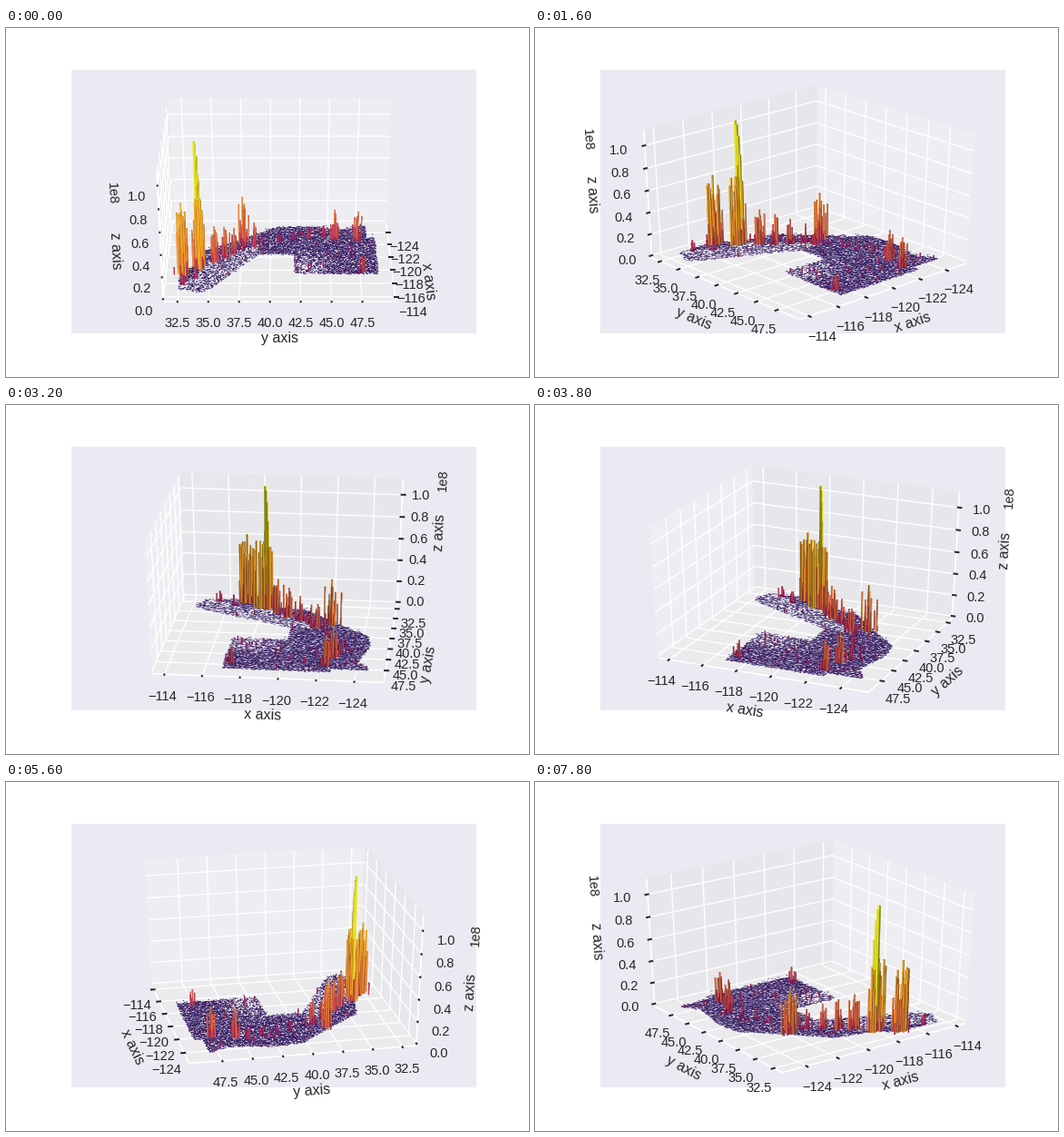
A matplotlib script for the animation above (8 s loop, 576x384 px).

```python
import numpy as np
import matplotlib.pyplot as plt
from matplotlib.animation import FuncAnimation
from matplotlib.collections import LineCollection, PolyCollection
from matplotlib.colors import LinearSegmentedColormap
from matplotlib.transforms import ScaledTranslation

plt.rcParams["font.family"] = "Liberation Sans"

FRAMES, INTERVAL, STEP_DEG = 40, 200, 6
ELEV = np.radians(30)
DIST = 10
EDGE = 0.5 + 1 / 48          # half size of the drawn box
DELTA = 1 / 12
PER_POINT = 48 / 552.2 / 12  # label offset in box units per point
INK = "#262626"

# data limits along x, y, z
LOW = np.array([-125.28, 31.72, 0.0])
HIGH = np.array([-113.6, 49.83, 1.115])

TICKS = [np.arange(-124, -113, 2), np.arange(32.5, 48, 2.5), np.arange(0, 1.1, 0.2)]
FORMATS = ["{:.0f}", "{:.1f}", "{:.1f}"]
SIDE = [1, 0, 0]             # direction in which each axis draws its ticks

rng = np.random.default_rng(7)


def to_box(values):
    return (np.asarray(values) - LOW) / (HIGH - LOW) - 0.5


# ---- data -----------------------------------------------------------------

# main hubs: lon, lat, peak
HUBS = [(-117.1, 32.75, 0.64), (-118.2, 34.0, 0.72), (-122.1, 37.6, 0.42),
        (-121.4, 38.6, 0.22), (-122.6, 45.5, 0.27), (-122.3, 47.5, 0.27),
        (-117.4, 47.65, 0.15)]


def coast(lat):
    line = np.interp(lat, [32.5, 33.9, 34.5, 37.7, 40.4, 42.8, 46.5, 48.3],
                     [-117.2, -118.5, -120.6, -122.5, -124.3, -124.5, -124.0, -124.7])
    return np.where(lat > 48.3, -122.7, line)


def border(lat):
    inland = np.interp(lat, [32.6, 34.3, 35, 39], [-114.7, -114.2, -114.6, -120])
    return np.where(lat > 42, -117, inland)


def make_ground(step=0.1):
    x, y = np.meshgrid(np.arange(-124.8, -114, step), np.arange(32.55, 49.05, step))
    inside = (x > coast(y)) & (x < border(y))
    x, y = x[inside], y[inside]
    keep = 0.9 + 0.12 * np.sin(5 * x + 2 * y) * np.sin(4 * y - x)
    keep -= 0.5 * np.exp(-(x + 118) ** 2 / 3 - (y - 43.2) ** 2 / 3)
    keep -= 0.45 * ((x - coast(y) > 1.8) & (y < 39))
    pts = np.column_stack([x, y])[rng.random(len(x)) < keep]
    return pts + rng.normal(0, 0.03, pts.shape)


def cluster(lon, lat, peak):
    count = int(75 * peak)
    spread = 0.12 + 0.16 * peak
    heights = peak * (0.1 + 0.8 * rng.random(count) ** 1.8)
    pts = np.column_stack([rng.normal(lon, spread, count), rng.normal(lat, spread, count), heights])
    return np.vstack([[lon, lat, peak], pts])


def towns(start, stop, peaks):
    """Small clusters strung along a line."""
    return [cluster(*place, peak) for place, peak in
            zip(np.linspace(start, stop, len(peaks)), peaks)]


def make_bars(ground):
    k = np.arange(5)
    towers = np.column_stack([-118.2 - 0.05 * k, 33.9 + 0.08 * k, HIGH[2] * (1 - 0.03 * k ** 2)])
    groups = [towers] + [cluster(*hub) for hub in HUBS]
    groups += towns((-119.0, 35.3), (-121.0, 37.7), np.linspace(0.32, 0.18, 4))
    groups += towns((-121.8, 39.3), (-123.0, 44.6), np.linspace(0.06, 0.10, 5))
    groups += towns((-116.4, 33.8), (-115.5, 32.8), [0.1, 0.1])
    rural = ground[rng.choice(len(ground), 90, replace=False)]
    groups.append(np.column_stack([rural, 0.01 + 0.05 * rng.random(90) ** 3]))
    return np.vstack(groups)


HEAT = LinearSegmentedColormap.from_list("heat", [
    (0.0, "#22135a"), (0.25, "#78196e"), (0.42, "#be2864"), (0.65, "#f07341"),
    (0.82, "#faaa28"), (0.91, "#eedc1e"), (1.0, "#eef01e")])

ground = make_ground()
bars = make_bars(ground)

# flat ground tiles
corner = np.array([(-1, -1), (1, -1), (1, 1), (-1, 1)])
tiles = np.zeros((len(ground), 4, 3))
tiles[..., :2] = ground[:, None] + corner * rng.uniform(0.045, 0.07, (len(ground), 1, 2))
tiles[..., 2] = rng.exponential(0.007, (len(ground), 1))
tiles = to_box(tiles)
tile_colors = HEAT(0.1 * rng.random(len(ground)) ** 2)

# bar geometry in box units, taller bars are wider
top = to_box(bars)
half = (0.02 + 0.03 * bars[:, 2:] / HIGH[2]) * (1, 1.3) / (HIGH - LOW)[:2]
base_colors = HEAT((bars[:, 2] / HIGH[2]) ** 0.3)[:, :3]
SHADE = np.array([0.8, 0.55, 0.98])     # top, y face, x face
bar_colors = base_colors[:, None, :] * SHADE[None, :, None]


def bar_faces(sx, sy):
    """Top and the two visible sides of every bar, shape (n, 3, 4, 3)."""
    faces = np.empty((len(top), 3, 4, 3))
    hx, hy = half[:, :1], half[:, 1:]
    x, y, z = (top[:, i, None] for i in range(3))
    sweep = np.array([-1, 1, 1, -1])
    wall = np.where(corner[:, 1] < 0, -0.5, z)
    flat = np.ones(4)
    faces[:, 0] = np.stack([x + hx * corner[:, 0], y + hy * corner[:, 1], z * flat], axis=-1)
    faces[:, 1] = np.stack([x + hx * sweep, (y + sy * hy) * flat, wall], axis=-1)
    faces[:, 2] = np.stack([(x + sx * hx) * flat, y + hy * sweep, wall], axis=-1)
    return faces


# ---- figure ---------------------------------------------------------------

fig = plt.figure(figsize=(6, 4), dpi=96, facecolor="white")
ax = fig.add_axes([0.125, 0.125, 0.775, 0.755], facecolor="#eaeaf2")
ax.set(xlim=(-0.095, 0.09), ylim=(-0.095, 0.09), xticks=[], yticks=[])
for spine in ax.spines.values():
    spine.set_visible(False)

pane_colors = [(v, v, v, 0.5) for v in (0.95, 0.90, 0.925)]
panes = PolyCollection([], facecolors=pane_colors, edgecolors=pane_colors, linewidths=1, zorder=1)
grid = LineCollection([], colors="white", linewidths=1, zorder=2)
edges = LineCollection([], colors="white", linewidths=1.25, zorder=2.1)
marks = LineCollection([], colors=INK, linewidths=1.5, capstyle="butt", zorder=2.2)
floor = PolyCollection([], facecolors=tile_colors, edgecolors="none", zorder=4)
spikes = PolyCollection([], linewidths=0.25, zorder=5)
for coll in (panes, grid, edges, marks, floor, spikes):
    coll.set_clip_on(False)
    ax.add_collection(coll, autolim=False)


def text(label, size, **kw):
    return ax.text(0, 0, label, size=size, color=INK, ha="center", **kw)


raised = ax.transData + ScaledTranslation(0, 1 / 96, fig.dpi_scale_trans)
tick_texts = [[text(fmt.format(v).replace("-", "\u2212"), 11, va="top", transform=raised)
               for v in vals] for fmt, vals in zip(FORMATS, TICKS)]
names = [text(f"{c} axis", 12, va="center") for c in "xyz"]
offset = text("1e8", 11, va="center", rotation_mode="anchor")


def view(azim):
    ca, sa, ce, se = np.cos(azim), np.sin(azim), np.cos(ELEV), np.sin(ELEV)
    eye = np.array([ca * ce, sa * ce, se])
    plane = np.array([(-sa, ca, 0), (-ca * se, -sa * se, ce)])

    def project(p):
        p = np.asarray(p)
        return p @ plane.T / (DIST - p @ eye)[..., None]

    return eye, project


def replaced(p, i, value):
    q = p.copy()
    q[i] = value
    return q


def outward(p, axis, points):
    """Push a point away from the box centre, across the given axis."""
    step = np.sign(p) * points * PER_POINT
    step[axis] = 0
    return p + step


def text_angle(p, q):
    dx, dy = ax.transData.transform(q) - ax.transData.transform(p)
    angle = np.degrees(np.arctan2(dy, dx)) % 180
    return angle - 180 if angle > 90 else angle


def update(frame):
    eye, project = view(np.radians(frame * STEP_DEG))
    far = np.where(eye >= 0, -EDGE, EDGE)
    near = -far

    walls, rules, rims, dashes = [], [], [], []
    for i in range(3):
        j, k = (i + 1) % 3, (i + 2) % 3
        side_j, side_k = replaced(far, j, near[j]), replaced(far, k, near[k])
        walls.append(project([far, side_j, replaced(side_j, k, near[k]), side_k]))

        side = SIDE[i]
        start = replaced(far, side, near[side])
        stop = replaced(start, i, near[i])
        ends = project([start, stop])
        rims.append(ends)
        angle = text_angle(*ends)

        places = (TICKS[i] - LOW[i]) / (HIGH[i] - LOW[i]) - 0.5
        for value, label in zip(places, tick_texts[i]):
            a = replaced(far, i, value)
            rules.append(project([replaced(a, j, near[j]), a, replaced(a, k, near[k])]))
            b = replaced(start, i, value)
            reach = np.sign(b[side]) * DELTA
            dashes.append(project([replaced(b, side, b[side] + 0.2 * reach),
                                   replaced(b, side, b[side] - 0.1 * reach)]))
            label.set_position(project(outward(b, i, 11.5)))

        names[i].set_position(project(outward((start + stop) / 2, i, 25)))
        names[i].set_rotation(angle)
        if i == 2:
            spot = project(outward(stop, i, 25))
            offset.set_position(spot)
            offset.set_rotation(angle)
            offset.set_ha("left" if spot[0] < 0 else "right")

    panes.set_verts(walls)
    grid.set_segments(rules)
    edges.set_segments(rims)
    marks.set_segments(dashes)
    floor.set_verts(project(tiles))

    order = np.argsort(top[:, :2] @ eye[:2])
    faces = bar_faces(np.sign(near[0]), np.sign(near[1]))[order]
    colors = bar_colors[order].reshape(-1, 3)
    spikes.set_verts(project(faces).reshape(-1, 4, 2))
    spikes.set_facecolor(colors)
    spikes.set_edgecolor(colors)
    return []


anim = FuncAnimation(fig, update, frames=FRAMES, interval=INTERVAL, repeat=True,
                     init_func=lambda: update(0))
plt.show()
```
